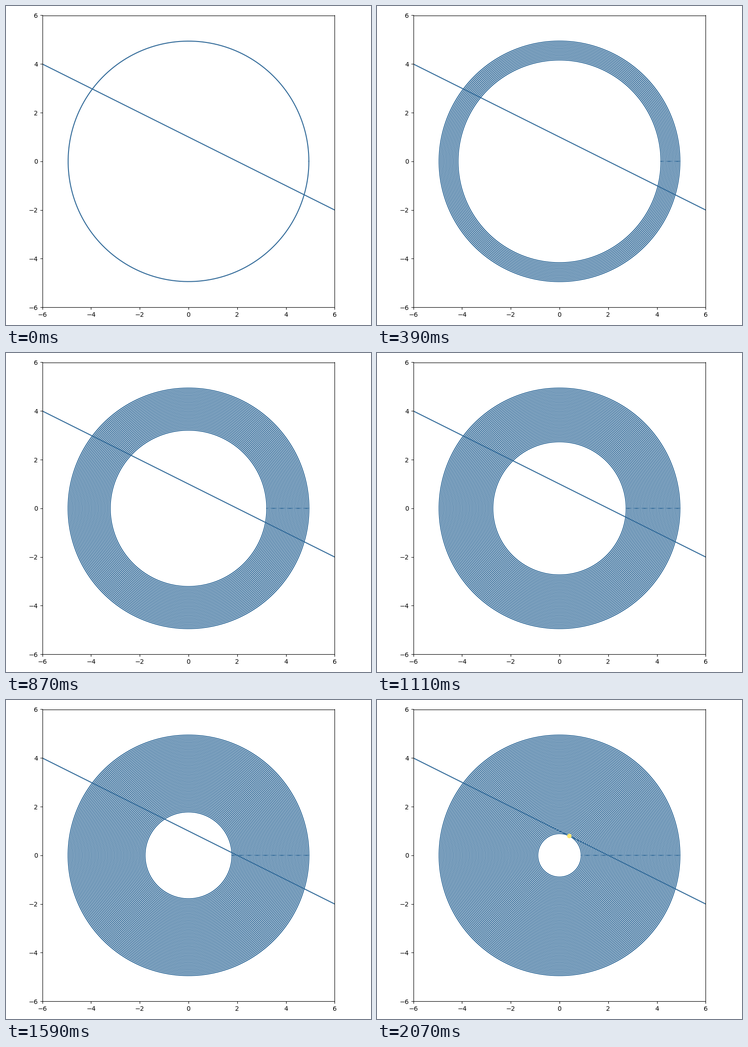
A matplotlib script that plays this animation: 800x700 px, repeating every 2.94 s.

```python
import numpy as np
import matplotlib.pyplot as plt
from matplotlib.animation import FuncAnimation

BLUE = "#306998"
YELLOW = "#FFE873"
FRAMES = 98
INTERVAL = 30
STEPS = 70

# Shrinking circles close in on the point of the line x + 2y = 2
# that lies nearest to the origin.
nearest = np.array([0.4, 0.8])
radii = np.linspace(5, np.hypot(*nearest), STEPS)[1:]

fig, ax = plt.subplots(figsize=(8, 7), dpi=100)
ax.set_aspect("equal")
ax.set_xlim(-6, 6)
ax.set_ylim(-6, 6)
ax.set_xticks(range(-6, 7, 2))
ax.set_yticks(range(-6, 7, 2))
fig.tight_layout()

x = np.linspace(-6, 6, 100)
ax.plot(x, 1 - x / 2, color=BLUE, lw=1.5)

theta = np.linspace(0, 2 * np.pi, 200)
circles = [
    ax.plot(r * np.cos(theta), r * np.sin(theta), color=BLUE, lw=1.5)[0]
    for r in radii
]
point, = ax.plot(*nearest, "o", color=YELLOW, ms=6, zorder=3)


def update(i):
    for k, circle in enumerate(circles):
        circle.set_visible(k <= i)
    point.set_visible(i >= len(circles))
    return [*circles, point]


anim = FuncAnimation(fig, update, frames=FRAMES, interval=INTERVAL,
                     repeat=True, repeat_delay=0, blit=False)
plt.show()
```
